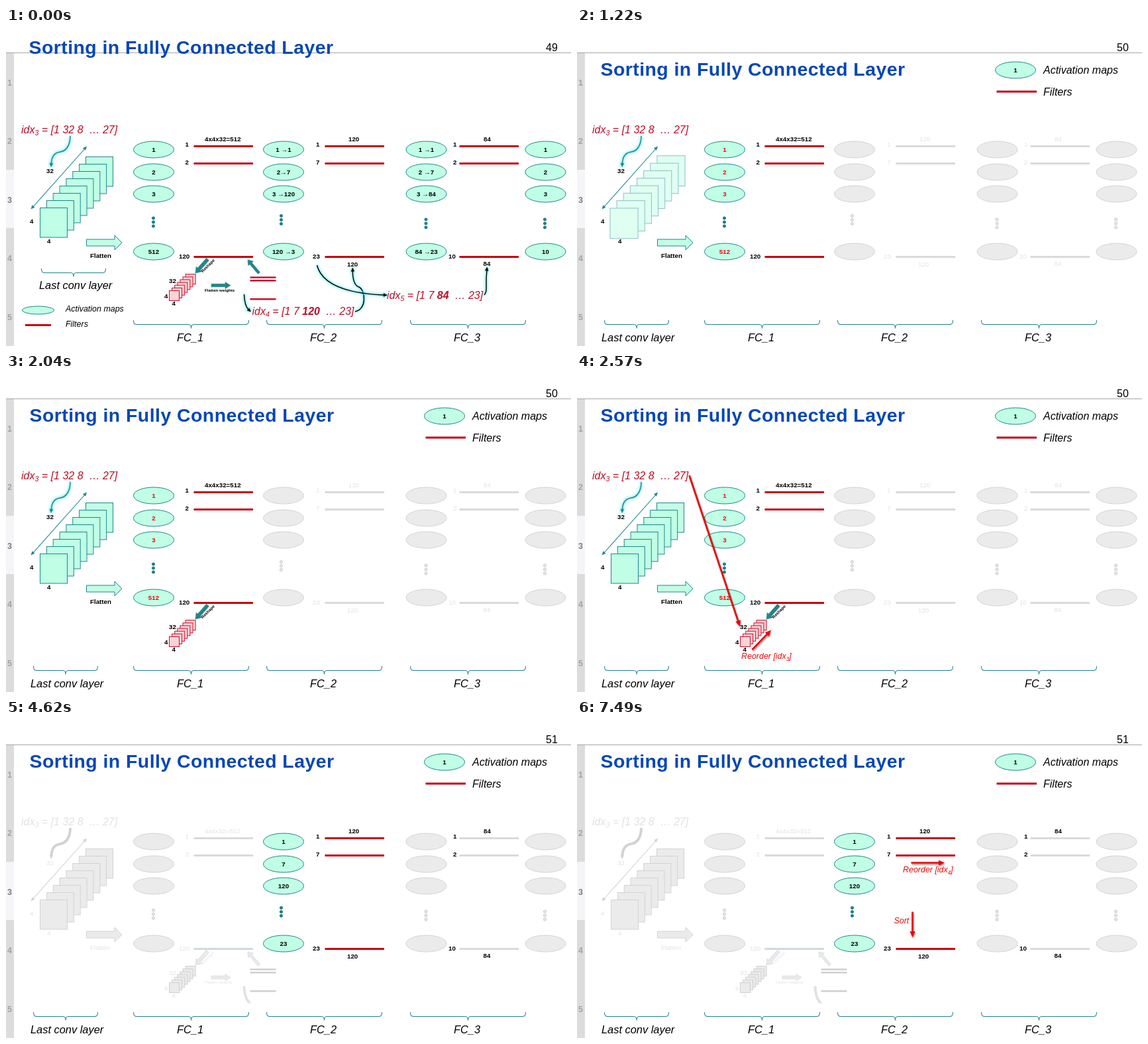
Write an HTML page that moves like this. It is 853 px wide and 480 px high and loops after 8000 ms.

```html
<!DOCTYPE html>
<html lang="en">
<head>
<meta charset="utf-8">
<title>Sorting in Fully Connected Layer</title>
<style>
html, body { margin: 0; width: 100%; height: 100%; overflow: hidden; background: #fff; }
svg {
  display: block; width: 853px; height: 480px;
  --mint: #c0ffe6; --teal: #1f868c; --red: #c8000f; --ink: #000; --pink: #fbd3d6;
  --idx: #c00d26; --dot: #1f7f86; --dotline: #1f7f86; --block: #238589; --edge: #238589;
  --pinkline: #c41230;
}
.fade {
  --mint: #ebebeb; --teal: #d3d3d3; --red: #dadada; --ink: #e2e2e2; --pink: #ebebeb;
  --idx: #e2e2e2; --dot: #e6e6e6; --dotline: #cdcdcd; --block: #e9e9e9; --edge: #d3d3d3;
  --pinkline: #d0d0d0;
}
.dim { --red: #dadada; }
text { font-family: "Liberation Sans", Arial, sans-serif; white-space: pre; fill: var(--ink); }
.title { font-size: 28.44px; font-weight: bold; letter-spacing: .45px; fill: #0447b5; }
.num { font-size: 16px; }
.b { font-size: 9.78px; font-weight: bold; }
.tiny { font-size: 6.22px; font-weight: bold; }
.fade .b, .fade .tiny { font-weight: normal; }
.mid { text-anchor: middle; }
.hot .mid { fill: #f00; }
.big { font-size: 16px; font-style: italic; }
.cap { font-size: 16.4px; font-style: italic; }
.small { font-size: 12.44px; font-style: italic; }
.idx { fill: var(--idx); }
.note { fill: #ee0a0a; }
.sub { font-size: 66.7%; }
.side { font-size: 12.5px; font-weight: bold; fill: #a3a3a3; }
.mint { fill: var(--mint); stroke: var(--teal); }
.pink { fill: var(--pink); stroke: var(--pinkline); }
.dot { fill: var(--dot); stroke: var(--dotline); }
.block { fill: var(--block); stroke: var(--edge); stroke-width: .6; }
.line { stroke: var(--red); stroke-width: 3; }
.thin { stroke: var(--pinkline); stroke-width: 2.6; }
.brace, .rule { fill: none; stroke: #1f868c; stroke-width: 1.1; }
.rule { stroke: var(--teal); }
.curve { fill: none; stroke-width: 1.4; }
.glow { filter: drop-shadow(0 0 2px #35dcdc) drop-shadow(0 0 1px #8ff0f0); }
.fade .glow { filter: none; }
.fade .curve { stroke-width: 4; }
.shadow { filter: drop-shadow(1.5px 2px 1.2px rgba(0,0,0,.45)); }
</style>
</head>
<body>
<svg id="stage" viewBox="0 0 853 480"></svg>
<script>
const LOOP = 8000;
const svg = document.getElementById('stage');

const text = (x, y, s, cls, more = '') => `<text x="${x}" y="${y}" class="${cls}" ${more}>${s}</text>`;
const path = (d, cls, more = '') => `<path d="${d}" class="${cls}" ${more}/>`;
const rect = (x, y, w, h, cls) => `<rect x="${x}" y="${y}" width="${w}" height="${h}" class="${cls}"/>`;
const oval = (x, y, rx = 30.5, ry = 12.5) => `<ellipse cx="${x}" cy="${y}" rx="${rx}" ry="${ry}" class="mint"/>`;
const group = (s, cls = '') => `<g class="${cls}">${s}</g>`;
const during = (from, to, s, cls = '') => `<g data-from="${from}" data-to="${to}" class="${cls}">${s}</g>`;
const sub = n => `<tspan class="sub" dy="3">${n}</tspan><tspan dy="-3">`;
const idx = (x, y, n, list) => text(x, y, `idx${sub(n)} = [${list}]</tspan>`, 'big idx');
const reorder = (x, y, n) => text(x, y, `Reorder [idx${sub(n)}]</tspan>`, 'small note');

const head = (x, y, angle, size, color) =>
  path(`M0 0L${-size} ${-size * .45}V${size * .45}Z`, '', `transform="translate(${x} ${y}) rotate(${angle})" fill="${color}"`);

function redArrow(x1, y1, x2, y2) {
  const a = Math.atan2(y2 - y1, x2 - x1);
  const bx = x2 - 6 * Math.cos(a), by = y2 - 6 * Math.sin(a);
  return group(path(`M${x1} ${y1}L${bx} ${by}`, '', 'stroke="#f00000" stroke-width="2.6"') +
    head(x2, y2, a * 180 / Math.PI, 9, '#f00000'), 'shadow');
}

const curve = (d, x, y, angle, color = 'var(--ink)') =>
  group(path(d, 'curve', `style="stroke:${color}"`) + head(x, y, angle, 6, color), 'glow');

// Block arrow: half thickness w, head length h, head half width k
function block(x1, y1, x2, y2, w, h, k, cls = 'block') {
  const len = Math.hypot(x2 - x1, y2 - y1), neck = len - h;
  const angle = Math.atan2(y2 - y1, x2 - x1) * 180 / Math.PI;
  return path(`M0 ${-w}H${neck}V${-k}L${len} 0L${neck} ${k}V${w}H0Z`, cls,
    `transform="translate(${x1} ${y1}) rotate(${angle})"`);
}

function brace(x, y, w) {
  const m = x + w / 2;
  return path(`M${x} ${y}q0 6.5 4 6.5H${m - 4}q4 0 4 6q0-6 4-6H${x + w - 4}q4 0 4-6.5`, 'brace');
}

const ovals = (x, labels = []) => [183.5, 217.5, 250.5, 337.5].map((y, i) =>
  oval(x, y) + (labels[i] ? text(x, y + 3.5, labels[i], 'b mid') : '')).join('');
const dots = (x, y) => [0, 6, 12].map(d => `<circle cx="${x}" cy="${y + d}" r="2.1" class="dot"/>`).join('');

function filters(x, marks, top, bottom) {
  return [178.5, 204.5, 345.5].map((y, i) => path(`M${x} ${y}h89.5`, 'line') +
    text(marks[i][0], y + [.5, 1.5, 2][i], marks[i][1], 'b')).join('') +
    text(...top, 'b') + (bottom ? text(...bottom, 'b') : '');
}

function stack(n, x, y, dx, dy, w, h, cls) {
  let s = '';
  for (let i = n - 1; i >= 0; i--) s += rect(x + i * dx, y - i * dy, w, h, cls);
  return s;
}

const fc1 = filters(283.5, [[270.5, '1'], [270.5, '2'], [261, '120']], [300, 171, '4x4x32=512']);
const fc2 = filters(481.5, [[468, '1'], [468, '7'], [463, '23']], [517, 170.5, '120'], [515, 360, '120']);
const fc3 = filters(684.5, [[675, '1'], [675, '2'], [668, '10']], [721, 170.5, '84'], [720.5, 358.5, '84']);
const dots1 = dots(222.5, 287), dots2 = dots(415.5, 283.5), dots3 = dots(634, 289), dots4 = dots(813.5, 289);

const conv = id => idx(23, 159, 3, '1 32 8  … 27') +
  `<g ${id ? `id="${id}"` : ''}>` + stack(8, 51.5, 271.5, 9.86, 11, 41, 44.5, 'mint') + '</g>' +
  path('M39 272L121 180', 'rule') + head(37.5, 273.5, 132, 6, 'var(--teal)') + head(122, 178.5, -48, 6, 'var(--teal)') +
  curve('M97 163C97 178 90 186 82 187C74 188 69 194 68.5 204', 68, 210, 94, 'var(--teal)') +
  text(61, 219, '32', 'b') + text(36, 295, '4', 'b') + text(62, 324.5, '4', 'b') +
  block(121.5, 324, 175, 324, 5, 11, 11, 'mint') + text(127, 347, 'Flatten', 'b');

const reshape = block(304.5, 349, 286, 370, 2.6, 8, 5.5) +
  text(0, 0, 'Reshape', 'tiny', 'transform="translate(297 369.5) rotate(-45)"') +
  stack(7, 246.5, 396.5, 4.1, 4.15, 15, 15, 'pink') +
  text(246, 385, '32', 'b') + text(239, 408, '4', 'b') + text(250.5, 419, '4', 'b');
const flatten = block(310, 388.5, 339, 388.5, 2.3, 8, 5) + text(300, 398, 'Flatten weights', 'tiny');
const rows = [376.5, 381.3, 409.3].map(y => path(`M368.5 ${y}h39`, 'thin')).join('') +
  block(382, 370, 365, 350, 2, 7, 5);
const hook = curve('M359.5 402C360 414 362 421 366 425', 370, 428.5, 42);
const idx4 = idx(371.5, 433, 4, '1 7 <tspan font-weight="bold">120</tspan>  … 23') +
  curve('M527 428C545 425 543 396 533 391C526 389 523.5 378 523.3 367', 523.3, 361.5, -91);

const frame = path('M0 37.5H853', '', 'stroke="#a6a6a6"') +
  '<path d="M0 38H12V480H0Z" fill="#dcdcdc"/><path d="M0 214H12V302H0Z" fill="#f5f5f8"/>' +
  [1, 2, 3, 4, 5].map(n => text(2, -2 + n * 88.5, n, 'side', n == 3 ? 'style="fill:#7c7c7c"' : '')).join('') +
  [[193, 258], [394, 459], [611, 676]].map(([x, tx], i) =>
    brace(x - .5, 441, 174) + text(tx, 473, 'FC_' + (i + 1), 'cap')).join('');

const heading = 'Sorting in Fully Connected Layer';

const overview = text(34.5, 39, heading, 'title') + text(815, 35, '49', 'num') +
  brace(53.5, 363, 97) + text(50, 394, 'Last conv layer', 'cap') +
  oval(48.5, 426, 24, 6) + path('M29 448.5h39', 'line') +
  text(90, 428, 'Activation maps', 'small') + text(90, 451, 'Filters', 'small') +
  ovals(223, ['1', '2', '3', '512']) + dots1 + fc1 +
  ovals(419, ['1 →1', '2→7', '3 →120', '120 →3']) + dots2 + fc2 +
  ovals(634.5, ['1 →1', '2 →7', '3 →84', '84 →23']) + dots3 + fc3 +
  ovals(814.5, ['1', '2', '3', '10']) + dots4 +
  reshape + flatten + rows + hook + idx4 +
  idx(575, 409, 5, '1 7 <tspan font-weight="bold">84</tspan>  … 23') +
  curve('M469.5 358C478 392 525 401 570 403', 576, 403.3, 3) +
  curve('M722 403C728 396 723 388 726 366', 726.3, 360.5, -85);

const legend = text(35.5, 72, heading, 'title') +
  oval(662, 63.5) + text(662, 67, '1', 'b mid') + path('M633.5 96h60.5', 'line') +
  text(704, 69, 'Activation maps', 'big') + text(704, 102, 'Filters', 'big') +
  brace(41.5, 441, 97) + text(37, 473, 'Last conv layer', 'cap');

const first = text(815, 35, '50', 'num') +
  group(ovals(223, ['1', '2', '3', '512']), 'hot') + dots1 + fc1 +
  group(ovals(419) + dots2 + fc2 + ovals(634.5) + dots3 + fc3 + ovals(814.5) + dots4, 'fade');

const second = text(815, 35, '51', 'num') +
  group(conv() + ovals(223) + dots1 + fc1 + reshape + flatten + rows + hook +
    ovals(634.5) + dots3 + ovals(814.5) + dots4, 'fade') +
  path('M283.5 345.5h89.5', '', 'stroke="#cbdbdf" stroke-width="2.6"') +
  ovals(419, ['1', '7', '120', '23']) + dots2 + fc2 + group(fc3, 'dim');

svg.innerHTML = frame +
  during(0, 500, overview) +
  during(500, LOOP, legend) +
  during(500, 4620, first) +
  during(0, 4620, conv('maps')) +
  during(2040, 4620, reshape) +
  during(2570, 4620, redArrow(169.5, 153, 246, 381) + redArrow(264.5, 416, 293, 386.5) + reorder(248, 430, 3)) +
  during(3030, 4620, flatten) +
  during(3560, 4620, rows) +
  during(4090, 4620, redArrow(310.5, 291.5, 310.5, 330) + text(282, 310, 'Sort', 'small note')) +
  during(4620, LOOP, second) +
  during(5690, LOOP, redArrow(504.5, 215.5, 555, 215.5) + reorder(492, 230, 4)) +
  during(5690, 6560, idx4) +
  during(7490, LOOP, redArrow(506.5, 289.5, 506.5, 328) + text(478.5, 307, 'Sort', 'small note'));

const parts = [...svg.querySelectorAll('[data-from]')];
const maps = document.getElementById('maps');

// Half-second pulse: grow 5% and back while half transparent, in 60 ms steps
function pulse(t) {
  const step = 1100 + Math.floor((t - 1100) / 60) * 60;
  const p = Math.min(1, Math.max(0, (step - 1080) / 500));
  const near = Math.min(p, 1 - p);
  const scale = 1 + .1 * near;
  maps.setAttribute('transform', `translate(106.5 255.5) scale(${scale}) translate(-106.5 -255.5)`);
  maps.setAttribute('opacity', 1 - .5 * Math.min(1, near / .2));
}

const start = performance.now();
function draw() {
  const t = (performance.now() - start) % LOOP;
  for (const g of parts) g.style.display = t >= g.dataset.from && t < g.dataset.to ? '' : 'none';
  pulse(t);
  requestAnimationFrame(draw);
}
draw();
</script>
</body>
</html>
```
